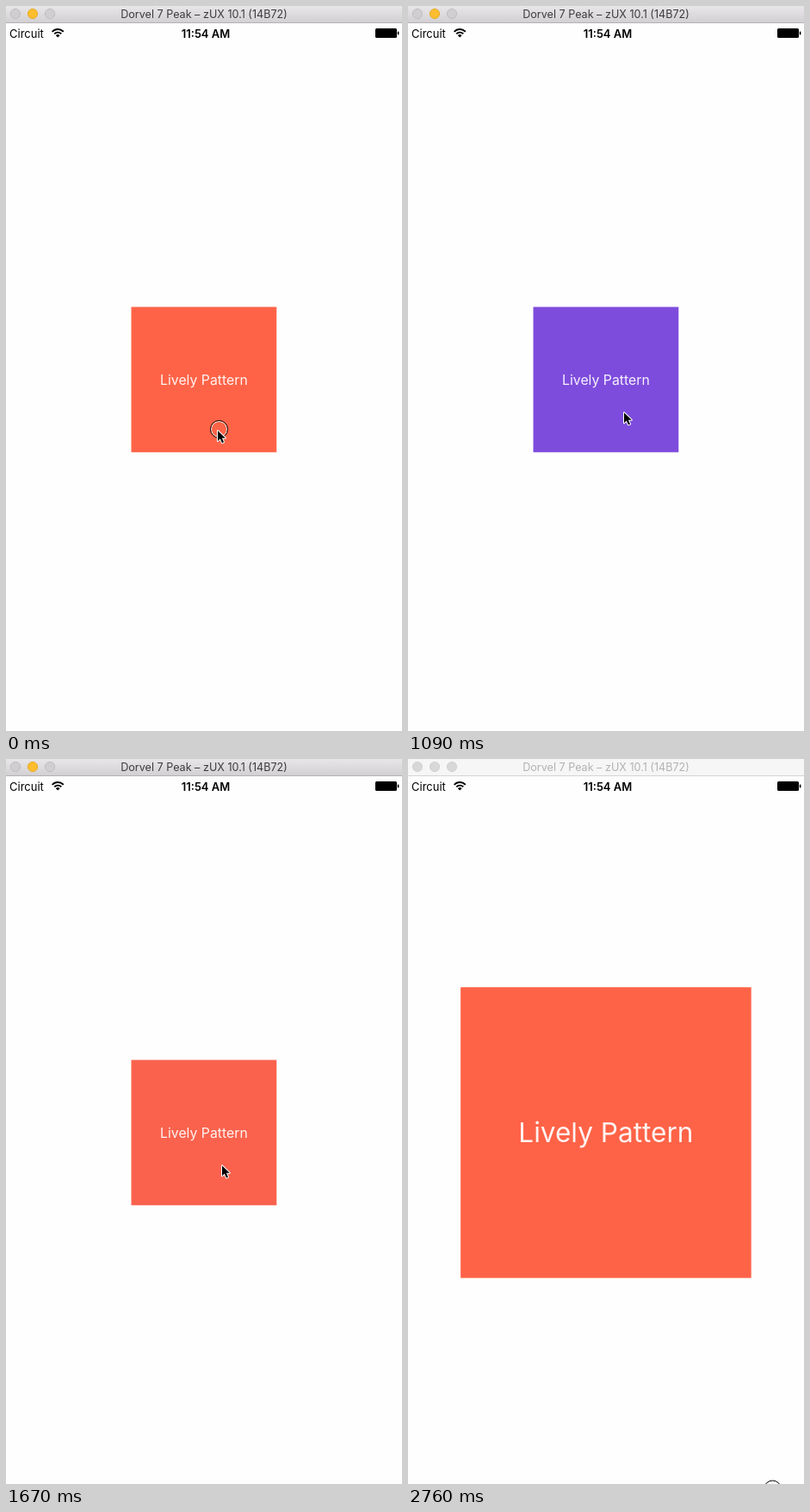
An HTML page with a canvas for the animation above (2.86 s loop, 460 by 842 pixels).

```html
<!DOCTYPE html>
<html lang="en">
<head>
<meta charset="utf-8">
<title>Square sequence</title>
<style>
  html, body { margin: 0; width: 100%; height: 100%; overflow: hidden; background: #fefefe; }
  canvas { display: block; }
</style>
</head>
<body>
<canvas id="stage" width="460" height="842"></canvas>
<script>
const ctx = document.getElementById('stage').getContext('2d');
const WIDTH = 460, HEIGHT = 842, LOOP = 2860;
const FONT = 'Inter, "Open Sans", sans-serif';
const TOMATO = [255, 99, 71], PURPLE = [115, 74, 234];

const TICKS = [0, 60, 270, 320, 380, 620, 740, 800, 860, 910, 970, 1030, 1090, 1150,
  1320, 1380, 1430, 1490, 1550, 1610, 1670, 1730, 1790, 1850, 1910, 1970, 2020,
  2080, 2140, 2200, 2260, 2430, 2490, 2760];

const mix = (a, b, k) => a + (b - a) * k;
const progress = (t, start, end) => Math.min(1, Math.max(0, (t - start) / (end - start)));

// Ease-in-out, cubic-bezier(.42, 0, .58, 1).
function ease(x) {
  let low = 0, high = 1;
  for (let i = 0; i < 24; i++) {
    const s = (low + high) / 2, r = 1 - s;
    if (1.26 * r * r * s + 1.74 * r * s * s + s * s * s < x) low = s; else high = s;
  }
  return low * low * (3 - 2 * low);
}

function text(value, x, y, size, color, weight = 400, align = 'center') {
  ctx.font = `${weight} ${size}px ${FONT}`;
  ctx.textAlign = align;
  ctx.fillStyle = color;
  ctx.fillText(value, x, y);
}

function disc(x, y, r, fill, line) {
  ctx.beginPath();
  ctx.arc(x, y, r, 0, Math.PI * 2);
  if (fill) {
    ctx.fillStyle = fill;
    ctx.fill();
  }
  if (line) {
    ctx.strokeStyle = line;
    ctx.lineWidth = 1;
    ctx.stroke();
  }
}

function titleBar(active) {
  const shade = ctx.createLinearGradient(0, 0, 0, 19);
  shade.addColorStop(0, active ? '#e8e6e8' : '#f6f6f6');
  shade.addColorStop(1, active ? '#d2d0d2' : '#f6f6f6');
  ctx.fillStyle = shade;
  ctx.fillRect(0, 0, WIDTH, 19);
  ctx.fillStyle = active ? '#b4b2b4' : '#d4d4d4';
  ctx.fillRect(0, 19, WIDTH, 1);
  [11, 31, 51].forEach((x, i) => {
    const lit = active && i === 1;
    disc(x, 9, 5.6, lit ? '#fdbd2e' : active ? '#d0ced0' : '#d8d8d8',
      lit ? '#e8ac2b' : active ? '#bfbdbf' : '#d2d2d2');
  });
  text('Dorvel 7 Peak – zUX 10.1 (14B72)', 230, 14, 12.6, active ? '#3c3b3c' : '#b2b2b2');
}

function statusBar() {
  text('Circuit', 4, 36.5, 13, '#000', 400, 'left');
  text('11:54 AM', 232, 36.5, 13, '#000', 600);

  ctx.strokeStyle = '#000';
  ctx.lineWidth = 1.9;
  for (const r of [5.4, 9]) {
    ctx.beginPath();
    ctx.arc(60.2, 36, r, -Math.PI * 0.76, -Math.PI * 0.24);
    ctx.stroke();
  }
  ctx.fillStyle = '#000';
  ctx.beginPath();
  ctx.moveTo(60.2, 36.4);
  ctx.arc(60.2, 36.4, 3.2, -Math.PI * 0.76, -Math.PI * 0.24);
  ctx.fill();

  ctx.beginPath();
  ctx.roundRect(429, 26, 25, 11, 1.5);
  ctx.roundRect(454.8, 29.5, 1.6, 4, 0.8);
  ctx.fill();
}

function square(t) {
  const tint = ease(progress(t, 690, 1190)) - ease(progress(t, 1240, 1740));
  const scale = 1 + ease(progress(t, 1715, 2015));
  const rgb = TOMATO.map((c, i) => Math.round(mix(c, PURPLE[i], tint)));
  ctx.save();
  ctx.translate(229.9, 433.9);
  ctx.scale(scale, scale);
  ctx.fillStyle = `rgb(${rgb})`;
  ctx.fillRect(-84.4, -84.4, 168.8, 168.8);
  text('Lively Pattern', 0, 5.6, 15.8, 'rgba(255,255,255,.93)');
  ctx.restore();
}

function pointerAt(t) {
  const nudge = progress(t, 235, 380);
  const leave = ease(progress(t, 2025, 2260));
  const sink = progress(t, 2370, 2490);
  return [
    mix(mix(245, 250, nudge), 420.5, leave) + 0.5 * sink,
    mix(mix(491, 470, nudge), 825, leave) + 22.5 * sink
  ];
}

function pointer(t) {
  const [x, y] = pointerAt(t);
  const pressed = t < 60 || (t >= 620 && t < 740) || t >= 2760;
  if (pressed) {
    disc(x + 2.5, y + 0.5, 9, null, '#fff');
    disc(x + 2.5, y + 0.5, 10, null, '#000');
  }
  ctx.save();
  ctx.translate(x, y);
  const arrow = new Path2D('M1 2.2V14.3L3.8 11.6L6 16.4L8 15.5L5.9 10.8H9.8Z');
  ctx.lineJoin = 'round';
  ctx.lineWidth = 2;
  ctx.strokeStyle = '#fff';
  ctx.stroke(arrow);
  ctx.fillStyle = '#000';
  ctx.fill(arrow);
  ctx.restore();
}

function draw(t) {
  ctx.fillStyle = '#fefefe';
  ctx.fillRect(0, 0, WIDTH, HEIGHT);
  titleBar(t < 2760);
  statusBar();
  square(t);
  pointer(t);
}

const start = performance.now();
function frame() {
  const now = (performance.now() - start) % LOOP;
  draw(TICKS.findLast(tick => tick <= now));
  requestAnimationFrame(frame);
}
frame();
</script>
</body>
</html>
```
